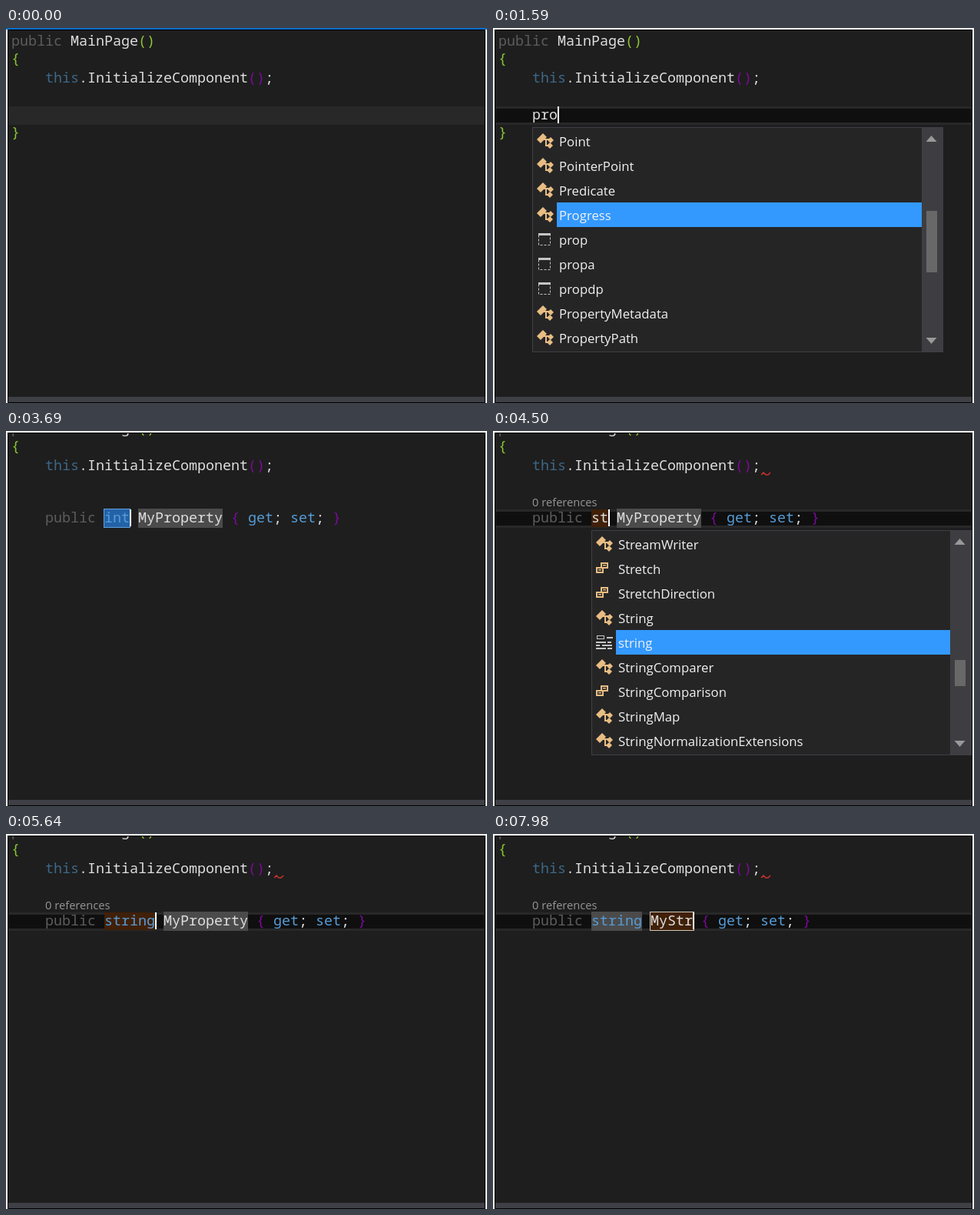
Recreate the animation shown at these times as an HTML page with a canvas. Size 626x488 px, loop 8000 ms.

```html
<!DOCTYPE html>
<html lang="en">
<head>
<meta charset="utf-8">
<title>Code editor</title>
<style>
html, body { margin: 0; width: 100%; height: 100%; overflow: hidden; background: #1e1e1e; }
canvas { display: block; width: 626px; height: 488px; }
</style>
</head>
<body>
<canvas id="stage" width="626" height="488"></canvas>
<script>
const ctx = document.getElementById('stage').getContext('2d');
const LOOP = 8000, CHAR = 11, LEFT = 7, INDENT = LEFT + 4 * CHAR;
const CODE = '18.33px "Noto Sans Mono", monospace';
const LIST = '16.75px "Open Sans", sans-serif';
const LENS = '14.7px "Open Sans", sans-serif';
const C = {
  bg: '#1e1e1e', text: '#dedede', dim: '#5c5c5c', self: '#3d6786', key: '#569cd6',
  green: '#8cc832', purple: '#7d0a9b', gray: '#4b4b4b', brown: '#402008', tan: '#e8bd83'
};

const rect = (color, x, y, w, h) => { ctx.fillStyle = color; ctx.fillRect(x, y, w, h); };
const frame = (color, x, y, w, h) => {
  ctx.strokeStyle = color;
  ctx.lineWidth = 1;
  ctx.strokeRect(x + .5, y + .5, w - 1, h - 1);
};
const poly = (color, ...p) => {
  ctx.fillStyle = color;
  ctx.beginPath();
  for (let i = 0; i < p.length; i += 2) ctx.lineTo(p[i], p[i + 1]);
  ctx.fill();
};
const line = (color, width, ...p) => {
  ctx.strokeStyle = color;
  ctx.lineWidth = width;
  ctx.beginPath();
  for (let i = 0; i < p.length; i += 2) ctx.lineTo(p[i], p[i + 1]);
  ctx.stroke();
};
const text = (font, color, s, x, y) => {
  ctx.font = font;
  ctx.fillStyle = color;
  ctx.fillText(s, x, y);
};
// Alternating text and colour
const code = (x, y, ...parts) => {
  for (let i = 0; i < parts.length; i += 2) {
    text(CODE, parts[i + 1], parts[i], x, y);
    x += parts[i].length * CHAR;
  }
};
const clamp = v => Math.min(1, Math.max(0, v));
const typed = (t, word, times) => word.slice(0, times.filter(at => t >= at).length);
const mix = (a, b, k) => `rgb(${a.map((v, i) => Math.round(v + (b[i] - v) * k))})`;

function icon(kind, x, y) {
  const diamond = (cx, cy, r) => poly(C.tan, cx - r, cy, cx, cy - r, cx + r, cy, cx, cy + r);
  if (kind === 'c') {
    poly(C.tan, x, y - 2, x + 8, y - 10, x + 13, y - 5, x + 5, y + 3);
    line(C.tan, 2, x + 8, y - 2, x + 18, y - 2);
    line(C.tan, 2, x + 12, y - 2, x + 12, y + 6, x + 17, y + 6);
    diamond(x + 18, y - 1, 4);
    diamond(x + 17, y + 6, 4);
  } else if (kind === 'e') {
    ctx.strokeStyle = C.tan;
    ctx.lineWidth = 2;
    ctx.strokeRect(x + 7, y - 7, 8, 6);
    ctx.strokeRect(x + 1, y - 1, 8, 6);
    rect(C.tan, x + 9, y - 5, 4, 1.5);
    rect(C.tan, x + 3, y + 1, 4, 1.5);
  } else if (kind === 'k') {
    const c = '#c5c5c5';
    frame(c, x + 1, y - 9, 10, 5);
    rect(c, x + 14, y - 7, 8, 2);
    rect(c, x, y - 1, 13, 2);
    rect(c, x + 15, y - 1, 5, 2);
    rect(c, x, y + 3, 5, 2);
    rect(c, x + 8, y + 3, 13, 2);
    rect(c, x, y + 7, 13, 2);
    rect(c, x + 15, y + 7, 6, 2);
  } else {
    ctx.setLineDash([3, 2]);
    frame('#c5c5c5', x + 2, y - 8, 16, 16);
    ctx.setLineDash([]);
    rect('#c5c5c5', x + 2, y - 8, 16, 3);
  }
}

// Rows start with a one-letter icon kind
function popup(x, right, rows, selected, thumbY, thumbH) {
  rect('#252526', x, 129, right - x, 293);
  rect('#3e3e42', right - 28, 130, 27, 291);
  rows.forEach((row, i) => {
    const y = 147 + i * 32;
    if (i === selected) rect('#3399ff', x + 32, y - 16, right - x - 60, 32);
    icon(row[0], x + 6, y);
    text(LIST, '#f1f1f1', row.slice(1), x + 35, y + 7);
  });
  const mid = right - 15.5;
  poly('#999', mid - 7, 148, mid, 140, mid + 7, 148);
  poly('#999', mid - 7, 403, mid, 411, mid + 7, 403);
  rect('#686868', right - 22, thumbY, 14, thumbH);
  frame('#3f3f46', x, 129, right - x, 293);
}

const P_ROWS = ['cPoint', 'cPointerPoint', 'cPredicate', 'cProgress', 'sprop', 'spropa',
  'spropdp', 'cPropertyMetadata', 'cPropertyPath'];
const S_ROWS = ['cStreamWriter', 'eStretch', 'eStretchDirection', 'cString', 'kstring',
  'cStringComparer', 'eStringComparison', 'cStringMap', 'cStringNormalizationExtensions'];

function band(active) {
  rect('#282828', 3, 102, 620, 24);
  if (active) rect('#0f0f0f', 3, 105, 620, 18);
}

const caret = x => rect('#fff', x - 1, 102, 2, 22);

// Selection brightens and gains an outline
function selection(x, w, k) {
  rect(mix([55, 80, 107], [35, 98, 168], k), x, 102, w, 24);
  if (k > 0) frame(mix([55, 80, 107], [96, 160, 220], k), x - 1, 101, w + 2, 25);
}

function property(t) {
  const type = t < 4350 ? 'int' : typed(t, 'string', [4350, 4470, 4590, 4710, 4860, 5010]);
  const name = t < 7020 ? 'MyProperty' : typed(t, 'MyStr', [7020, 7320, 7530, 7890, 7980]);
  const typeX = INDENT + 7 * CHAR, typeW = type.length * CHAR;
  const nameX = typeX + typeW + CHAR, nameW = name.length * CHAR;
  const onName = t >= 6270, typingType = t >= 4350 && t < 5820;

  if (t >= 4350 && t < 6270 || t >= 7020) band(true);

  if (onName) rect(C.gray, typeX, 101, typeW, 25);
  else if (t < 4350) selection(typeX, typeW, clamp(Math.floor((t - 2355) / 75) / 3));
  else rect(C.brown, typeX, 102, typeW, 23);

  if (!onName) rect(C.gray, nameX, 101, nameW, 25);
  else if (t < 7020) selection(nameX, nameW, clamp(Math.floor((t - 6450) / 60) / 2));
  else {
    rect(C.brown, nameX, 102, nameW, 23);
    frame('#d2c8b8', nameX - 1, 101, nameW + 3, 25);
  }

  code(INDENT, 119, 'public ', C.dim, type, typingType && t < 5220 ? C.text : C.key,
    ' ' + name + ' ', C.text, '{ ', C.purple, 'get', C.key, '; ', C.text,
    'set', C.key, '; ', C.text, '}', C.purple);

  const hidden = t >= 2940 && t < 3450 || t >= 3960 && t < 4350 ||
    t >= 5490 && t < 5640 || t >= 6000 && t < 6120;
  if (!hidden) caret(onName ? nameX + nameW + 1 : typeX + typeW + 1);

  if (t >= 4410 && t < 5640) {
    const h = [0, 20, 34, 72, 93, 93, 93][type.length];
    popup(typeX, 623, S_ROWS, 4, 332 - h, h);
  }
}

function shorthand(t) {
  const word = typed(t, 'prop', [900, 1260, 1440, 1620]);
  band(t >= 330);
  code(INDENT, 119, word, C.text);
  code(LEFT, 142, '}', C.green);
  if (t >= 330) caret(INDENT + word.length * CHAR + 1);
  if (t >= 1050 && t < 1950) {
    const n = word.length - 1;
    popup(INDENT, 586, P_ROWS, [0, 2, 3, 4][n], [196, 230, 238, 245][n], [40, 60, 80, 93][n]);
  }
}

function draw(t) {
  rect('#fff', 0, 0, 626, 488);
  rect('#000', 2, 2, 622, 486);
  rect(C.bg, 3, 3, 620, 484);
  if (t < 330) rect('#0a6fc8', 0, 0, 626, 2);
  rect('#3f3f46', 3, 480, 620, 7);

  ctx.save();
  ctx.beginPath();
  ctx.rect(3, 3, 620, 484);
  ctx.clip();
  const up = t >= 3690 ? 20 : 0;
  code(LEFT, 23 - up, 'public ', C.dim, 'MainPage', C.text, '()', C.green);
  code(LEFT, 46 - up, '{', C.green);
  code(INDENT, 71 - up, 'this', C.self, '.InitializeComponent', C.text,
    '()', C.purple, ';', C.text);
  if (t >= 3720) {
    text(LENS, '#969696', '0 references', INDENT, 98);
    line('#c8322d', 1.5, 349, 57, 352, 54, 355, 57, 358, 57, 361, 54);
  }
  if (t < 2250) shorthand(t);
  else property(t);
  ctx.restore();
}

function tick() {
  draw(performance.now() % LOOP);
  requestAnimationFrame(tick);
}
tick();
</script>
</body>
</html>
```
